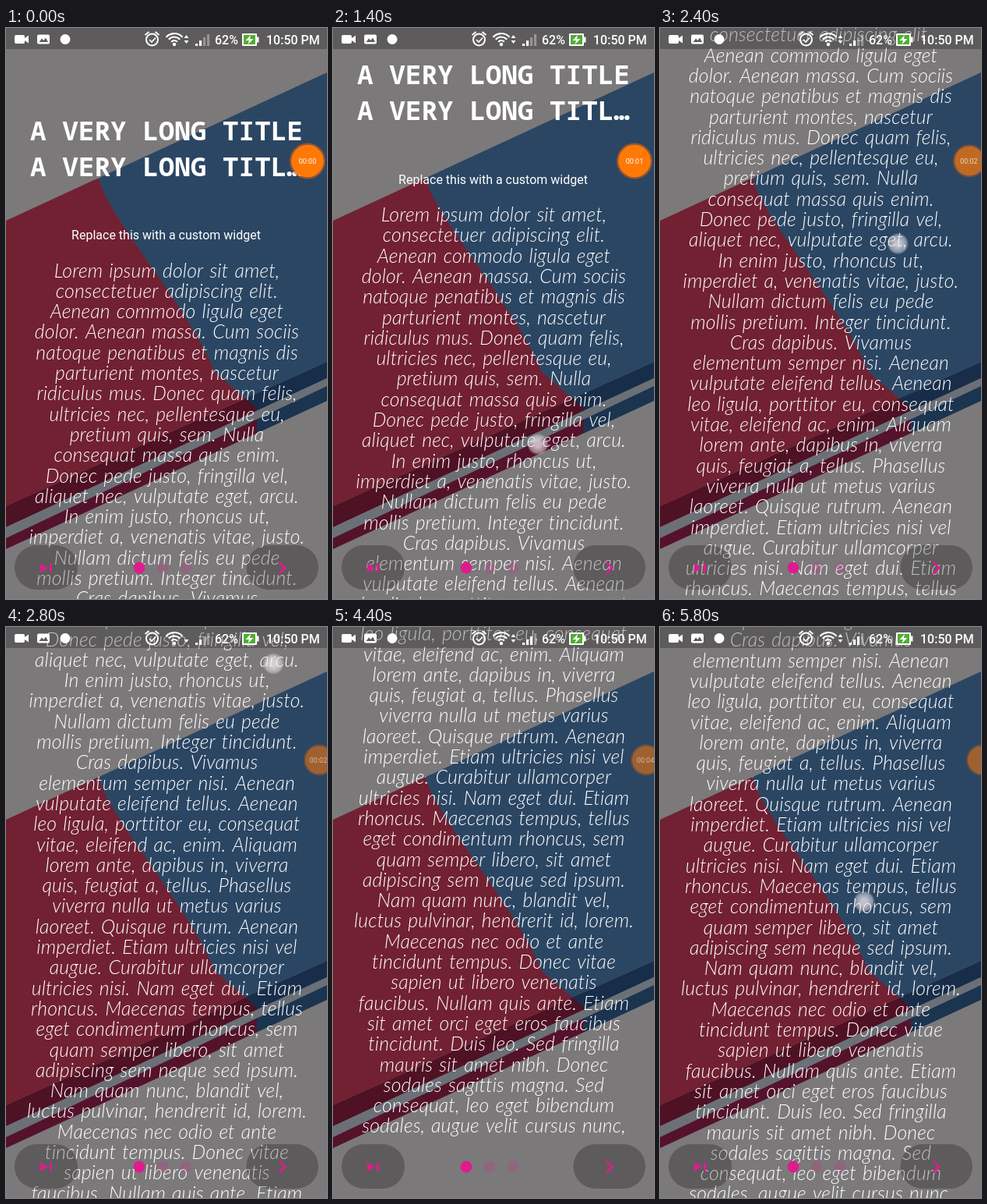
Recreate the animation shown at these times as an HTML page with a canvas. Size 412 by 732 pixels, loop 6 s.

```html
<!DOCTYPE html>
<html lang="en">
<head>
<meta charset="utf-8">
<title>Intro slide</title>
<style>
html, body { margin: 0; width: 100%; height: 100%; overflow: hidden; background: #7c797b; }
canvas { display: block; width: 412px; height: 732px; }
</style>
</head>
<body>
<canvas id="stage" width="412" height="732"></canvas>
<script>
const c = document.getElementById('stage').getContext('2d');
const W = 412, H = 732, LOOP = 6000, STEP = 200, LINE = 26.3;
const WHITE = '#fff', PINK = '#de1c8e', SHADE = 'rgba(0,0,0,.25)';

const body = `Lorem ipsum dolor sit amet,
consectetuer adipiscing elit.
Aenean commodo ligula eget
dolor. Aenean massa. Cum sociis
natoque penatibus et magnis dis
parturient montes, nascetur
ridiculus mus. Donec quam felis,
ultricies nec, pellentesque eu,
pretium quis, sem. Nulla
consequat massa quis enim.
Donec pede justo, fringilla vel,
aliquet nec, vulputate eget, arcu.
In enim justo, rhoncus ut,
imperdiet a, venenatis vitae, justo.
Nullam dictum felis eu pede
mollis pretium. Integer tincidunt.
Cras dapibus. Vivamus
elementum semper nisi. Aenean
vulputate eleifend tellus. Aenean
leo ligula, porttitor eu, consequat
vitae, eleifend ac, enim. Aliquam
lorem ante, dapibus in, viverra
quis, feugiat a, tellus. Phasellus
viverra nulla ut metus varius
laoreet. Quisque rutrum. Aenean
imperdiet. Etiam ultricies nisi vel
augue. Curabitur ullamcorper
ultricies nisi. Nam eget dui. Etiam
rhoncus. Maecenas tempus, tellus
eget condimentum rhoncus, sem
quam semper libero, sit amet
adipiscing sem neque sed ipsum.
Nam quam nunc, blandit vel,
luctus pulvinar, hendrerit id, lorem.
Maecenas nec odio et ante
tincidunt tempus. Donec vitae
sapien ut libero venenatis
faucibus. Nullam quis ante. Etiam
sit amet orci eget eros faucibus
tincidunt. Duis leo. Sed fringilla
mauris sit amet nibh. Donec
sodales sagittis magna. Sed
consequat, leo eget bibendum
sodales, augue velit cursus nunc,`.split('\n');

// Progress from 0 to 1 between two times
const ramp = (t, from, to) => Math.min(1, Math.max(0, (t - from) / (to - from)));

// A slow drag that speeds up, a second drag to the end, a drag back
const scrollAt = t => 363 * ramp(t, 1057, 2800) + 195 * ramp(t, 2000, 2800) ** 2
  + 244 * ramp(t, 3000, 3820) - 87 * ramp(t, 5000, 5800);

function poly(color, ...pts) {
  c.fillStyle = color;
  c.beginPath();
  for (let i = 0; i < pts.length; i += 2) c.lineTo(pts[i], pts[i + 1]);
  c.fill();
}

function rect(color, x, y, w, h, r = 0) {
  c.fillStyle = color;
  c.beginPath();
  c.roundRect(x, y, w, h, r);
  c.fill();
}

function disc(color, x, y, r) {
  c.fillStyle = color;
  c.beginPath();
  c.arc(x, y, r, 0, 2 * Math.PI);
  c.fill();
}

function arc(color, width, x, y, r, from = 0, to = 2 * Math.PI) {
  c.strokeStyle = color;
  c.lineWidth = width;
  c.beginPath();
  c.arc(x, y, r, from, to);
  c.stroke();
}

function stroke(color, width, ...pts) {
  c.strokeStyle = color;
  c.lineWidth = width;
  c.beginPath();
  for (let i = 0; i < pts.length; i += 2) c.lineTo(pts[i], pts[i + 1]);
  c.stroke();
}

function text(str, x, y, font, align = 'center') {
  c.font = font;
  c.textAlign = align;
  c.fillStyle = WHITE;
  c.fillText(str, x, y);
}

// Slanted face with a shaded edge, a pale gap and a thin strip below
function eraser(face, edge, strip) {
  const band = (color, left, right, leftEnd, rightEnd) =>
    poly(color, 0, left, W, right, W, rightEnd, 0, leftEnd);
  band(face, 247, 57, 613, 428);
  band(edge, 613, 428, 640, 449);
  band('#6b7077', 640, 449, 654, 459);
  band(strip, 654, 459, 668, 478);
}

function backdrop() {
  rect('#7c797b', 0, 0, W, H);
  c.save();
  c.beginPath();
  c.rect(0, 193, 323, H);
  c.clip();
  eraser('#712132', '#4f1124', '#54132a');
  c.restore();

  c.save();
  c.beginPath();
  c.moveTo(120, 0);
  c.lineTo(120, 196);
  c.bezierCurveTo(130, 240, 236, 360, 268, 441);
  c.lineTo(322, 488);
  c.lineTo(322, H);
  c.lineTo(W, H);
  c.lineTo(W, 0);
  c.clip();
  eraser('#2b4663', '#182d49', '#1b3450');
  c.restore();
}

function content(scroll) {
  c.save();
  c.translate(0, -scroll);
  const mono = '700 34.3px "Noto Sans Mono", "DejaVu Sans Mono", monospace';
  text('A VERY LONG TITLE', 206, 143.5, mono);
  text('A VERY LONG TITL…', 206, 189.5, mono);
  text('Replace this with a custom widget', 205.5, 271, '16px Roboto, sans-serif');
  c.letterSpacing = '0.15px';
  c.wordSpacing = '1.7px';
  body.forEach((s, i) =>
    text(s, 206.5, 319.5 + i * LINE, 'italic 300 24.8px Lato, sans-serif'));
  c.letterSpacing = c.wordSpacing = '0px';
  c.restore();
}

function controls() {
  rect(SHADE, 11, 663, 81, 57, 28.5);
  rect(SHADE, 308.5, 663, 92.5, 57, 28.5);
  poly(PINK, 44, 686, 53.5, 692, 44, 698);
  rect(PINK, 56, 686, 2.8, 12);
  stroke(PINK, 2.6, 350.5, 684.5, 358.5, 692, 350.5, 699.5);
  for (let i = 0; i < 3; i++) disc(i ? 'rgba(222,28,142,.2)' : PINK, 171 + 30 * i, 692, 7.4);
}

function statusBar(t) {
  rect(SHADE, 0, 0, W, 27);

  // Camera, picture, app
  rect(WHITE, 11, 9, 13, 11, 2);
  poly(WHITE, 24, 13, 29, 9.5, 29, 19.5, 24, 16);
  rect(WHITE, 40, 8.5, 16, 12, 2);
  poly('#5d5b5c', 42.5, 18, 46, 13.5, 48.5, 16, 51, 12.5, 54, 18);
  disc(WHITE, 76, 14.5, 6.5);

  // Alarm
  arc(WHITE, 2, 187.5, 15, 7.5);
  stroke(WHITE, 2, 178.5, 9, 183.5, 5);
  stroke(WHITE, 2, 191.5, 5, 196.5, 9);
  stroke(WHITE, 1.7, 184, 15, 187, 18, 192, 12.5);

  // Wi-Fi
  for (let r = 5; r < 15; r += 4.5)
    arc(WHITE, 2.2, 216, 21, r, -Math.PI * .77, -Math.PI * .23);
  disc(WHITE, 216, 21, 2.2);
  if (t < 2600 || t > 4200) poly(WHITE, 228.5, 13, 231.5, 9, 234.5, 13);
  poly(WHITE, 228.5, 16, 231.5, 20, 234.5, 16);

  // Signal
  const bars = t < 4000 ? 2 : 3;
  for (let i = 0; i < 4; i++) {
    const h = 3 + i * 4;
    rect(i < bars ? WHITE : 'rgba(255,255,255,.35)', 243 + i * 5, 23 - h, 3.2, h);
  }

  // Battery and clock
  const font = '500 16px Roboto, sans-serif';
  text('62%', 268, 20.5, font, 'left');
  rect(WHITE, 303, 7, 19, 16, 1);
  rect(WHITE, 322, 11.5, 2.5, 7);
  rect('#4fae32', 305, 9, 15, 12);
  poly(WHITE, 314, 9, 307.5, 16, 312, 16, 310.5, 21, 317.5, 14, 313, 14);
  text('10:50 PM', 334, 20.5, font, 'left');
}

// Recording timer that fades and slips behind the right edge
function badge(t) {
  const away = ramp(t, 1600, 2800);
  const x = 387 + 15 * away + 11 * ramp(t, 4600, 5200), r = 22 - 3 * away;
  c.save();
  c.globalAlpha = 1 - .45 * away;
  disc('#ff7906', x, 170.5, r - 1);
  arc('rgba(190,90,30,.75)', 1.8, x, 170.5, r);
  const seconds = Math.max(0, Math.floor((t - 300) / 1000));
  if (t < 5000) text('00:0' + seconds, x - away, 174, '9px Roboto, sans-serif');
  c.restore();
}

// The finger holds one point of the scrolled page; lean is its sideways drift
function touch(t, scroll) {
  const drag = [
    { from: 1000, to: 2800, x: 351, hold: 605, lean: -.165 },
    { from: 3200, to: 3800, x: 215, hold: 1172, lean: 0 },
    { from: 5000, to: 5800, x: 262, hold: 1067, lean: 0 }
  ].find(d => t >= d.from && t <= d.to);
  if (!drag) return;
  const y = drag.hold - scroll, x = drag.x + drag.lean * y;
  const glow = c.createRadialGradient(x, y, 4, x, y, 14);
  glow.addColorStop(0, 'rgba(240,236,240,.75)');
  glow.addColorStop(.7, 'rgba(225,220,225,.5)');
  glow.addColorStop(1, 'rgba(215,210,215,0)');
  disc(glow, x, y, 14);
}

function draw() {
  const t = Math.floor(performance.now() % LOOP / STEP) * STEP;
  const scroll = scrollAt(t);
  backdrop();
  content(scroll);
  controls();
  statusBar(t);
  badge(t);
  touch(t, scroll);
  requestAnimationFrame(draw);
}
draw();
</script>
</body>
</html>
```
